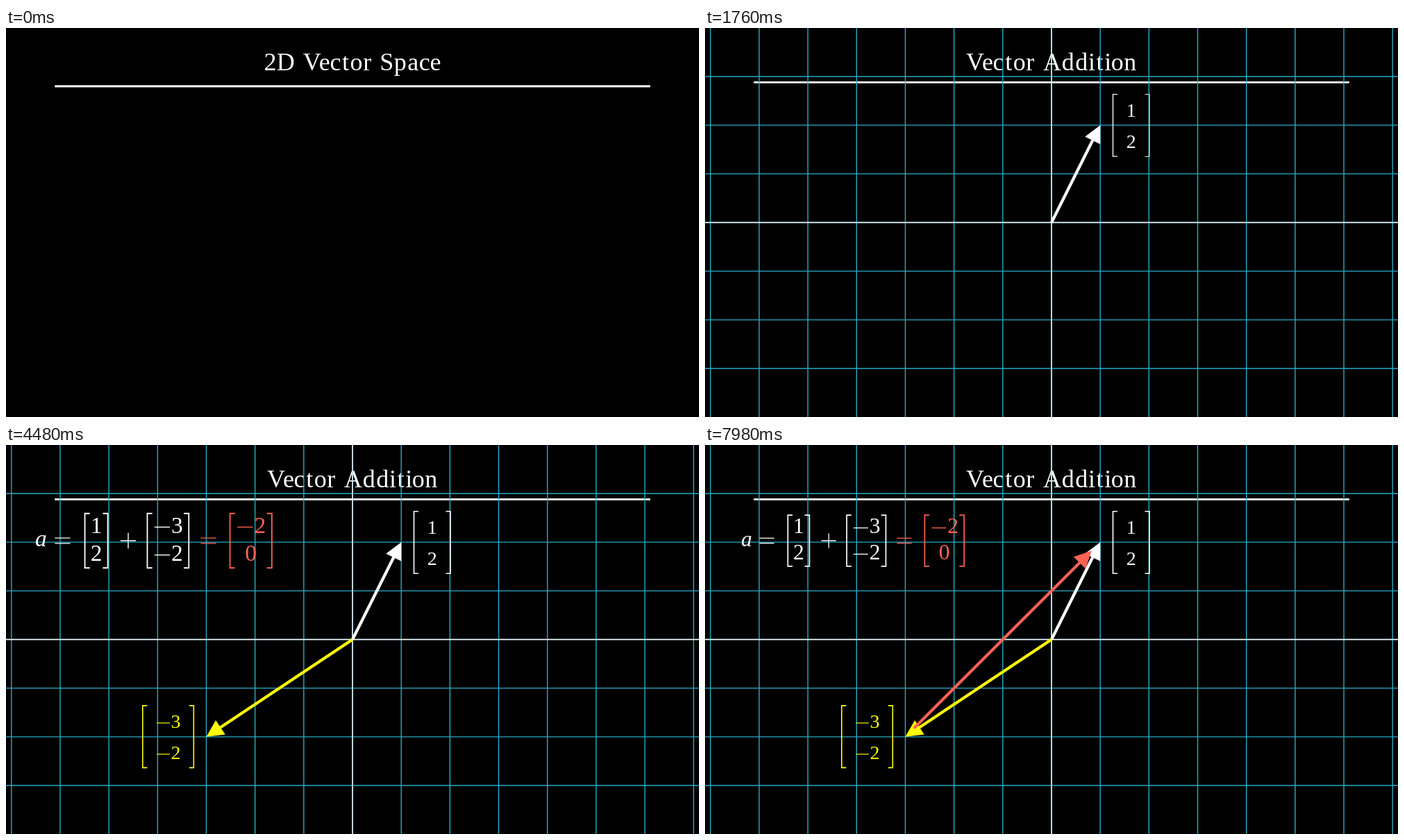
Write an HTML page with a canvas that moves like this. It is 998 px wide and 561 px high and loops after 8000 ms.

```html
<!DOCTYPE html>
<html lang="en">
<head>
<meta charset="utf-8">
<title>Vector Addition</title>
<style>
  html, body { margin: 0; width: 100%; height: 100%; overflow: hidden; background: #000; }
  canvas { display: block; }
</style>
</head>
<body>
<canvas id="stage" width="998" height="561"></canvas>
<script>
const ctx = document.getElementById('stage').getContext('2d');
const W = 998, H = 561, UNIT = W / (128 / 9), CX = W / 2, CY = H / 2;
const WHITE = '#fff', YELLOW = '#ff0', RED = '#fc6255', BLUE = '#29abca';
const LOOP = 8000, STEP = 1000;
const SERIF = '"Liberation Serif", "Times New Roman", serif';

const clamp = (v, lo = 0, hi = 1) => Math.min(hi, Math.max(lo, v));
const lerp = (a, b, u) => a + (b - a) * u;
const sigmoid = x => 1 / (1 + Math.exp(-x));
const smooth = t => {
  const e = sigmoid(-5);
  return clamp((sigmoid(10 * (clamp(t) - 0.5)) - e) / (1 - 2 * e));
};
const point = (x, y) => [CX + x * UNIT, CY - y * UNIT];

function line(x1, y1, x2, y2, width, color) {
  ctx.strokeStyle = color;
  ctx.lineWidth = width;
  ctx.beginPath();
  ctx.moveTo(x1, y1);
  ctx.lineTo(x2, y2);
  ctx.stroke();
}

// ---- Title: letters morph through blended distance fields ----
const TITLE_EM = 35, TITLE_FONT = `36px ${SERIF}`, BASELINE = 60.5;
const ADVANCE = { V: 0.75, e: 0.444, c: 0.444, t: 0.389, r: 0.392, ' ': 0.333, A: 0.75,
  d: 0.556, i: 0.278, n: 0.556, D: 0.764, S: 0.556, p: 0.556 };

function layout(text) {
  let x = 0;
  const glyphs = [];
  for (const ch of text) {
    const w = (ADVANCE[ch] || 0.5) * TITLE_EM;
    if (ch !== ' ') glyphs.push({ ch, x: x + w / 2 });
    x += w - (ch === 'V' ? 0.083 * TITLE_EM : 0);
  }
  glyphs.forEach(g => g.x += CX - x / 2);
  return glyphs;
}
const before = layout('2D Vector Space');
const after = layout('Vector Addition');

const TW = 72, TH = 84, REACH = 4;
const tile = document.createElement('canvas');
tile.width = TW;
tile.height = TH;
const tctx = tile.getContext('2d', { willReadFrequently: true });
const fields = {};

// Signed distance to the letter's edge at double resolution, limited to REACH.
function field(ch) {
  if (fields[ch]) return fields[ch];
  tctx.setTransform(1, 0, 0, 1, 0, 0);
  tctx.clearRect(0, 0, TW, TH);
  tctx.setTransform(2, 0, 0, 2, 0, 0);
  tctx.font = TITLE_FONT;
  tctx.textAlign = 'center';
  tctx.fillStyle = WHITE;
  tctx.fillText(ch, TW / 4, 30);
  const data = tctx.getImageData(0, 0, TW, TH).data;
  const inside = (x, y) => x >= 0 && y >= 0 && x < TW && y < TH && data[(y * TW + x) * 4 + 3] > 127;
  const out = new Float32Array(TW * TH);
  for (let y = 0; y < TH; y++) for (let x = 0; x < TW; x++) {
    const here = inside(x, y);
    let d = REACH + 0.5;
    for (let j = -REACH; j <= REACH; j++) for (let i = -REACH; i <= REACH; i++)
      if (inside(x + i, y + j) !== here) d = Math.min(d, Math.hypot(i, j));
    out[y * TW + x] = here ? d - 0.5 : 0.5 - d;
  }
  return fields[ch] = out;
}

function morph(from, to, u, alpha) {
  const a = field(from.ch), b = field(to.ch), img = tctx.createImageData(TW, TH);
  const bias = 4 * u * (1 - u);
  for (let i = 0; i < a.length; i++) {
    img.data.fill(255, i * 4, i * 4 + 3);
    img.data[i * 4 + 3] = 255 * clamp(lerp(a[i], b[i], u) + bias + 0.5);
  }
  tctx.putImageData(img, 0, 0);
  ctx.globalAlpha = alpha;
  ctx.drawImage(tile, lerp(from.x, to.x, u) - TW / 4, BASELINE - 30, TW / 2, TH / 2);
  ctx.globalAlpha = 1;
}

function title(u) {
  if (u < 0.001 || u > 0.995) {
    ctx.font = TITLE_FONT;
    ctx.fillStyle = WHITE;
    for (const g of u < 0.5 ? before : after) ctx.fillText(g.ch, g.x, BASELINE);
  } else {
    // The extra letter starts as an invisible copy of the first one.
    after.forEach((g, i) => morph(before[Math.max(0, i - 1)], g, u, i === 1 ? u : 1));
  }
  const y = lerp(84, 78.3, u);
  line(CX - 6.11 * UNIT, y, CX + 6.11 * UNIT, y, 2.8, WHITE);
}

function grid() {
  for (let k = -3; k <= 3; k++) line(0, CY - k * UNIT, W, CY - k * UNIT, 1.4, BLUE);
  for (let k = -7; k <= 7; k++) line(CX + k * UNIT, 0, CX + k * UNIT, H, 1.4, BLUE);
  line(0, CY, W, CY, 1.4, WHITE);
  line(CX, 0, CX, H, 1.4, WHITE);
}

// Shaft in the first half, then the head traced tip, left, right.
function arrow([x1, y1], [x2, y2], color, p) {
  const len = Math.hypot(x2 - x1, y2 - y1), dx = (x2 - x1) / len, dy = (y2 - y1) / len;
  const head = 0.35 * UNIT, half = head / 2;
  const shaft = smooth(2 * p) * (len - head + 1), k = 3 * smooth(2 * p - 1);
  line(x1, y1, x1 + dx * shaft, y1 + dy * shaft, 4.2, color);
  const bx = x2 - dx * head, by = y2 - dy * head;
  const corners = [[x2, y2], [bx + dy * half, by - dx * half], [bx - dy * half, by + dx * half], [x2, y2]];
  ctx.fillStyle = color;
  ctx.beginPath();
  ctx.moveTo(x2, y2);
  for (let i = 0; i < 3; i++) {
    const u = clamp(k - i), [a, b] = corners[i], [c, d] = corners[i + 1];
    ctx.lineTo(lerp(a, c, u), lerp(b, d, u));
  }
  ctx.fill();
}

// ---- Formula pieces: each is a function of its writing progress u ----
const glyph = (ch, x, y, em, color, style = '') => u => {
  ctx.font = `${style} ${em}px ${SERIF}`;
  ctx.strokeStyle = ctx.fillStyle = color;
  if (u < 1) {
    ctx.setLineDash([clamp(2 * u) * em * 4, em * 4]);
    ctx.lineWidth = 1.4 * Math.min(1, 2 - 2 * u);
    ctx.strokeText(ch, x, y);
    ctx.setLineDash([]);
  }
  ctx.globalAlpha = clamp(2 * u - 1);
  ctx.fillText(ch, x, y);
  ctx.globalAlpha = 1;
};

const rule = (paths, width, color) => u => {
  ctx.strokeStyle = color;
  ctx.lineWidth = lerp(0.9, width, clamp(2 * u - 1));
  if (u < 0.5) ctx.setLineDash([u * 220, 220]);
  ctx.beginPath();
  for (const path of paths) path.forEach(([x, y], i) => i ? ctx.lineTo(x, y) : ctx.moveTo(x, y));
  ctx.stroke();
  ctx.setLineDash([]);
};

const bar = (x, y, em) => [[x - em / 3, y], [x + em / 3, y]];
const minus = (x, y, em, color) => rule([bar(x, y, em)], em * 0.042, color);
const equals = (x, y, em, color) => rule([bar(x, y - em * 0.117, em), bar(x, y + em * 0.117, em)], em * 0.042, color);
const plus = (x, y, em, color) => rule([bar(x, y, em), [[x, y - em / 3], [x, y + em / 3]]], em * 0.042, color);
const bracket = (x, hook, top, bottom, width, color) =>
  rule([[[x + hook, top], [x, top], [x, bottom], [x + hook, bottom]]], width, color);

function number(n, x, y, em, color) {
  const digit = String(Math.abs(n));
  return n < 0
    ? [minus(x - em / 4, y - em / 4, em, color), glyph(digit, x + em * 0.39, y, em, color)]
    : [glyph(digit, x, y, em, color)];
}

function label(left, right, top, a, b, color) {
  const x = (left + right) / 2;
  return [
    ...number(a, x, top + 32, 28, color), ...number(b, x, top + 77, 28, color),
    bracket(left, 6.5, top, top + 89.5, 1.6, color), bracket(right, -6.5, top, top + 89.5, 1.6, color)
  ];
}

function column(left, right, a, b, color) {
  const x = (left + right) / 2;
  return [
    bracket(left, 7.5, 97, 179, 1.9, color),
    ...number(a, x, 126.3, 35, color), ...number(b, x, 168.3, 35, color),
    bracket(right, -7.5, 97, 179, 1.9, color)
  ];
}

const firstLabel = label(587.5, 640, 95.7, 1, 2, WHITE);
const secondLabel = label(196.8, 270.3, 375.9, -3, -2, YELLOW);
const MID = 138, sum = [
  glyph('a', 43, 146.8, 35, WHITE, 'italic'), equals(75.5, MID, 35, WHITE),
  ...column(109, 143.5, 1, 2, WHITE), plus(174.3, MID, 35, WHITE),
  ...column(203, 265.5, -3, -2, WHITE), equals(295, MID, 35, RED),
  ...column(327.5, 390.5, -2, 0, RED)
];

function write(pieces, p) {
  const n = pieces.length, lag = Math.min(4 / (n + 1), 0.2), full = 1 + (n - 1) * lag;
  pieces.forEach((piece, i) => {
    const u = clamp(p * full - i * lag);
    if (u > 0) piece(u);
  });
}

function render(t) {
  const phase = k => clamp(t / STEP - k);
  ctx.fillStyle = '#000';
  ctx.fillRect(0, 0, W, H);
  ctx.textAlign = 'center';
  title(smooth(phase(0)));
  if (t < STEP) return;

  grid();
  const origin = point(0, 0);
  arrow(origin, point(1, 2), WHITE, phase(1));
  write(firstLabel, phase(1));
  if (phase(2)) {
    arrow(origin, point(-3, -2), YELLOW, phase(2));
    write(secondLabel, phase(2));
  }
  if (phase(3)) {
    const scale = 1.002 * lerp(1, 0.9, smooth(phase(4)));
    ctx.save();
    ctx.translate(214, MID);
    ctx.scale(scale, scale);
    ctx.translate(-214, -MID);
    write(sum, phase(3));
    ctx.restore();
  }
  if (phase(5)) {
    const gap = 0.25 * Math.SQRT1_2;
    arrow(point(-3 + gap, -2 + gap), point(1 - gap, 2 - gap), RED, phase(5));
  }
}

function frame() {
  render(performance.now() % LOOP);
  requestAnimationFrame(frame);
}
render(0);
requestAnimationFrame(frame);
</script>
</body>
</html>
```
